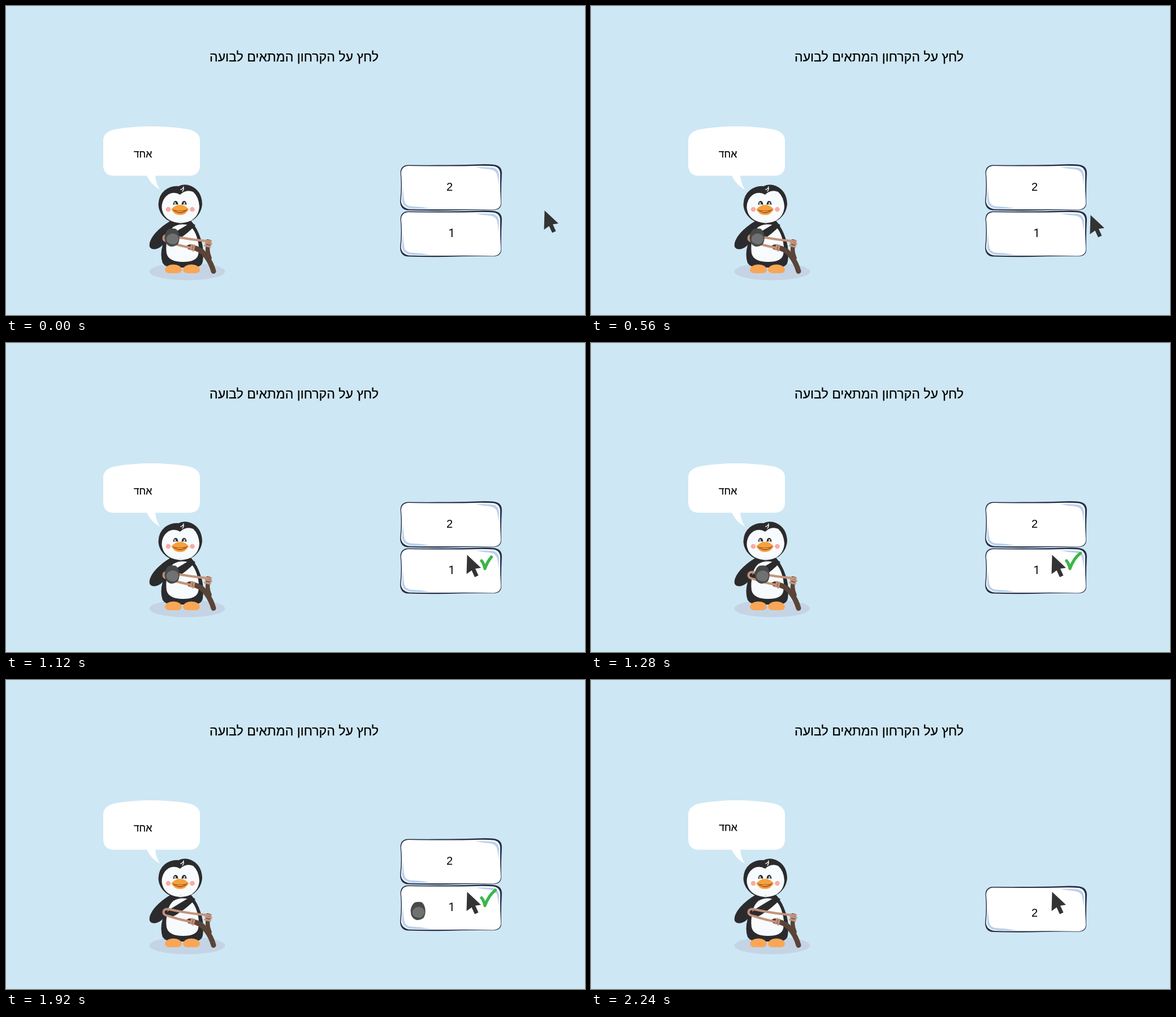
Write an HTML page that moves like this. It is 1024 by 547 pixels and loops after 3.68 s.

```html
<!DOCTYPE html>
<html lang="he">
<head>
<meta charset="utf-8">
<style>
html, body { margin: 0; width: 100%; height: 100%; overflow: hidden; background: #cee7f4; }
svg { display: block; width: 100%; height: 100%; }
text { font-family: "Liberation Sans", Arial, sans-serif; font-size: 20px; text-anchor: middle; fill: #000; }
.hebrew { direction: rtl; font-size: 17.7px; stroke: #000; stroke-width: .25px; }
.title { font-size: 23.1px; }
.one { font-family: Roboto, Arial, sans-serif; }
.line { fill: none; stroke-linecap: round; stroke-linejoin: round; }
</style>
</head>
<body>
<svg viewBox="0 0 1024 547">
  <defs>
    <path id="edge" d="M711 281.5Q786 282 830 280.5Q852 279.5 864 281Q877 283 877 296Q875.500 322 876 349Q876 361 862 361.2Q820 360.5 780 362Q740 362.5 710 361.500Q697 360 697 345Q700 320 697.5 295Q698 282 711 281.5Z"/>
    <g id="card">
      <use href="#edge" fill="#27304a"/>
      <path fill="#fff" d="M712 283Q790 284 830 283Q850 282.5 862 283.500Q873.5 285 874 297Q873.500 322 875.2 348Q875 360 861 360.5Q820 359.300 780 360Q735 360.300 713 359.5Q699.500 357 698.5 345Q701.5 320 698.8 296Q699.500 283.500 712 283Z"/>
      <path fill="#b9d1ea" d="M830 285.5Q846 285 861 286Q871 288 872 299L871 318Q870 304 868 297Q865 290 855 289Q842 288 830 285.5Z"/>
      <path fill="#b9d1ea" d="M702 319Q702.5 334 704.5 345Q706 353 715 354.5Q733 355 752 358.5Q728 359.5 713 358Q702 355 700.5 345Q701 332 702 319Z"/>
    </g>
  </defs>

  <rect width="1024" height="547" fill="#cee7f4"/>
  <text class="hebrew title" x="509.5" y="98">לחץ על הקרחון המתאים לבועה</text>

  <path fill="#fff" d="M172 237Q173 223 192 218.500Q224 213 257 213Q292 213 323 218.500Q342 223 343 237V283Q342 300 325 300.500H264Q265 313 272 325Q257 317 249 300.500H190Q173 300 172 283Z"/>
  <text id="word" class="hebrew">אחד</text>

  <g id="penguin">
    <ellipse cx="320.500" cy="470" rx="67" ry="15.500" fill="#c5d4e5"/>
    <path fill="#2b2b2d" d="M290 381Q276 389 264 402Q252 416 254 426Q257 432 266 430Q273 428 277 423Q272 441 277 455Q282 463 298 463H330Q346 463 348 452Q351 430 344 411Q339 395 328 381Z"/>
    <path fill="#f8fbfd" d="M296 391Q309 384 322 388Q333 393 338 411Q343 427 340 440Q337 453 313 453Q288 453 284 438Q282 424 286 408Q289 397 296 391Z"/>
    <path fill="#2b2b2d" d="M328 383Q309 394 293 404Q281 411 285 418Q291 422 302 415Q320 404 335 388Z"/>
    <path fill="#2b2b2d" d="M269.500 351Q270 335 281 326Q293 317.500 305 319Q315 314 327 318.500Q346 327 347 350Q346 367 332 378Q321 385 308 385Q294 385 284 378Q270 367 269.500 351Z"/>
    <path fill="#f8fbfd" d="M308 334Q298 328 288 333Q275.500 341 275.500 357Q277 373 291 380Q309 388 327 380Q341 372 342 355Q341 338 331 329Q318 324 308 334Z"/>
    <path fill="#e6edf2" d="M304 383L309 379L313 383Q309 386 304 383Z"/>
    <path class="line" stroke="#fff" stroke-width="1.300" d="M309 325Q313 324 314 320M312 328Q315 325 314 322"/>
    <g fill="#2b2b2d">
      <path d="M295.500 352Q296 345 300 345Q304 345 304.500 352Q300 350 295.500 352ZM310.500 352Q311 345 315 345Q319 345 319.500 352Q315 350 310.500 352Z"/>
      <g fill="#fff"><circle cx="299" cy="349" r="1.500"/><circle cx="315.500" cy="349" r="1.500"/></g>
    </g>
    <g fill="#fbaaa2"><circle cx="287" cy="360" r="4.300"/><circle cx="329.500" cy="360" r="4.300"/></g>
    <path fill="#f4a23c" d="M292.500 360Q299 352 308 352Q317 352 323 360Q318 370 308 370Q297 370 292.500 360Z"/>
    <path fill="#b4532a" d="M294 360Q302 363 308 361.500Q315 363 322 359Q316 367 308 367Q299 366 294 360Z"/>
    <path fill="#f4a23c" d="M299 364Q308 361 316 364Q308 365.500 299 364Z"/>
    <g fill="#f9a656">
      <path d="M281 466Q283 458 296 457.500Q309 458 311 466Q311 473 303 473H289Q281 473 281 466Z"/>
      <path d="M313 466Q315 458 328 457.500Q341 458 343 466Q343 473 335 473H321Q313 473 313 466Z"/>
    </g>
    <g class="line">
      <path stroke="#5a4437" stroke-width="9" d="M325 426.500Q345 429 354 443Q363 455 367 469.500"/>
      <path stroke="#5a4437" stroke-width="7.500" d="M358.500 418Q354 432 360 446"/>
      <path stroke="#463429" stroke-width="4" d="M322 425L324 429M356 415L361 416"/>
      <path stroke="#c4937b" stroke-width="4" d="M362 416.500Q325 414 289 406Q279 404 278.500 411Q278 416 288 418Q306 424 326 428"/>
      <path stroke="#c4937b" stroke-width="3.500" d="M353 419L363 421M352 424L361 426M329 423L327 431M333 424L331 433"/>
      <path stroke="#8e6553" stroke-width="0.800" d="M353 421.500L363 423.500M331 424L329 432"/>
    </g>
  </g>

  <g id="two"><use href="#card"/></g>
  <text id="label" x="784.500">2</text>

  <g id="one">
    <g transform="translate(0 82)">
      <use id="glow" href="#edge" fill="#27304a" stroke="#27304a" stroke-width="8"/>
      <use href="#card"/>
    </g>
    <text class="one" x="788" y="409">1</text>
    <path id="tick" class="line" stroke="#3db54a" stroke-width="5.300" pathLength="100" d="M841 385.500Q845 390 847 399.500Q853 382 865.500 372"/>
  </g>

  <g id="stone">
    <path fill="#484949" d="M-13 -1Q-12 -10 -6 -15Q0 -17 7 -15.500Q12 -11 13 -3Q14 6 10 12Q5 16 -2 16Q-9 14 -12 7Z"/>
    <path fill="#6f7271" d="M-10 2Q-9 -6 1 -7.500Q10 -7 11.500 0Q12 8 6 11.500Q-2 13 -7 9Q-10 6 -10 2Z"/>
  </g>
  <path id="arrow" fill="#333" d="M-0.500 -1L24 22L14 23.500L19.500 35.500L13 38.500L7.500 26.500L-1.500 33Z"/>
</svg>
<script>
const LOOP = 3680, STEP = 40;
const el = id => document.getElementById(id);
const set = (id, attrs) => {
  for (const key in attrs) el(id).setAttribute(key, attrs[key]);
};
const part = (t, from, to) => Math.min(1, Math.max(0, (t - from) / (to - from)));
const move = (id, x, y) => set(id, { transform: `translate(${x} ${y})` });

function draw(time) {
  const t = Math.floor((time % LOOP) / STEP) * STEP;

  const reach = part(t, 200, 760);
  move('arrow', 953 - 137 * reach ** 1.55, 363 + 13 * reach ** 1.1);
  set('glow', { visibility: t >= 600 && t < 1000 ? 'inherit' : 'hidden' });

  const tick = part(t, 960, 1160);
  set('tick', {
    'stroke-dasharray': `${100 * tick} 200`,
    visibility: tick > 0 ? 'inherit' : 'hidden'
  });

  const release = part(t, 1160, 1280), flight = part(t, 1360, 1920);
  move('stone', 293.5 + 9 * release + 426 * flight ** 1.58, 410 - flight);

  const fade = 1 - part(t, 1920, 2040);
  set('one', { opacity: fade });
  set('stone', { opacity: fade });

  const dropped = t >= 2240;
  move('two', 0, dropped ? 84.5 : 0);
  set('label', { y: dropped ? 419 : 327 });
  set('word', { x: dropped ? 242.5 : 242, y: dropped ? 267 : 268 });
}

const start = performance.now();
function play() {
  draw(performance.now() - start);
  requestAnimationFrame(play);
}
play();
</script>
</body>
</html>
```
